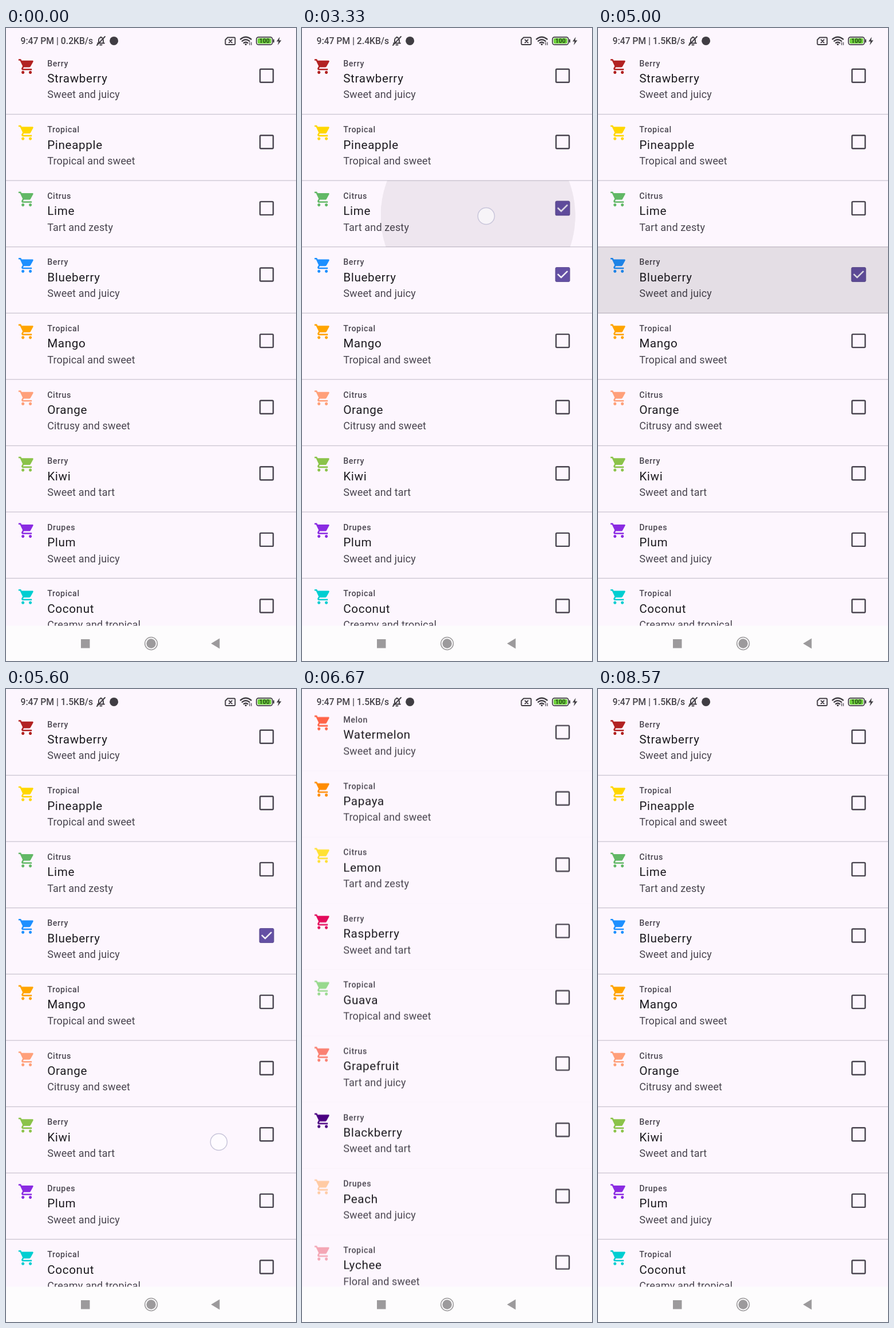
Recreate the animation shown at these times as an HTML page. Size 507x1104 px, loop 8600 ms.

```html
<!DOCTYPE html>
<html lang="en">
<head>
<meta charset="utf-8">
<title>Fruit list</title>
<style>
  html, body { margin: 0; width: 100%; height: 100%; overflow: hidden; background: #fdf6fe; }
  svg { display: block; width: 100%; height: 100%; font-family: Roboto, sans-serif; }
  .label { font-size: 14.2px; font-weight: 500; letter-spacing: .65px; fill: #49454f; }
  .title { font-size: 20.66px; letter-spacing: .65px; fill: #1d1b20; }
  .note { font-size: 18.07px; letter-spacing: .12px; fill: #49454f; }
  .clock { font-size: 15.7px; font-weight: 500; fill: #454248; }
  .box { fill: none; stroke: #49454f; stroke-width: 2.4; }
  .tick { fill: none; stroke: #fff; stroke-width: 2.4; stroke-linecap: square; }
  .ripple { fill: #1d1b20; opacity: 0; }
  .touch { fill: #fff; fill-opacity: .55; stroke: #c8c5da; stroke-width: 1.5; opacity: 0; }
  .line { fill: none; stroke: #403d43; stroke-width: 1.9; stroke-linecap: round; stroke-linejoin: round; }
</style>
</head>
<body>
<svg viewBox="0 0 507 1104" preserveAspectRatio="none">
  <defs>
    <path id="cart" d="M7 18c-1.1 0-2 .9-2 2s.9 2 2 2 2-.9 2-2-.9-2-2-2zM1 2v2h2l3.6 7.6-1.35 2.45c-.16.28-.25.6-.25.95 0 1.1.9 2 2 2h12v-2H7.42c-.14 0-.25-.11-.25-.25l.03-.12.9-1.63h7.45c.75 0 1.41-.41 1.75-1.03l3.58-6.49c.08-.14.12-.31.12-.48 0-.55-.45-1-1-1H5.21l-.94-2H1zm16 16c-1.1 0-2 .9-2 2s.9 2 2 2 2-.9 2-2-.9-2-2-2z"/>
    <clipPath id="row"><rect width="507" height="115.6"/></clipPath>
  </defs>
  <rect width="507" height="1104" fill="#fdf6fe"/>
  <g id="list"><g id="rows"></g><g id="dividers"></g><g id="ripples"></g></g>

  <rect width="507" height="35" fill="#fdf6fe"/>
  <g id="clock"></g>
  <g class="line">
    <path d="M160 26.5h12M162 26v-5a4 4.5 0 0 1 8 0v5M166 15.5v1M164.5 29.5h3M159 30L173 15"/>
    <path d="M387.5 16.5h11.5a1.5 1.5 0 0 1 1.5 1.5v9.5a1.5 1.5 0 0 1-1.5 1.5h-14a1.5 1.5 0 0 1-1.5-1.5v-7zM390 20.5l5 5M395 20.5l-5 5"/>
    <path d="M410 19.5q9-7.5 18.5 0M412.8 22.8q6.2-5 12.8 0M415.8 26q3.3-2.6 6.7 0" stroke-width="2.3"/>
    <path d="M426 25v4.5M429 29.5V25" stroke-width="1.2"/>
    <rect x="437.8" y="15.8" width="28" height="13.4" rx="4" stroke-width="1.7"/>
    <path d="M468 20.5v4" stroke-width="2"/>
  </g>
  <circle cx="188.7" cy="22.4" r="7.5" fill="#403d43"/>
  <circle cx="419.2" cy="28.6" r="1.7" fill="#403d43"/>
  <rect x="439.8" y="17.8" width="24" height="9.4" rx="2.2" fill="#6fd23c"/>
  <text x="451.8" y="26.3" text-anchor="middle" font-size="10.5" font-weight="700" fill="#244a18">100</text>
  <path d="M478.5 15.5l-5.5 8h3.6l-1.6 6.5 6.4-8.6h-3.9z" fill="#403d43"/>

  <rect y="1042.5" width="507" height="62" fill="#fdfcfd"/>
  <g fill="#9c9a9c">
    <rect x="131" y="1066" width="15.5" height="15.5"/>
    <circle cx="253.7" cy="1073.5" r="8.2"/>
    <circle cx="253.7" cy="1073.5" r="10.9" fill="none" stroke="#9c9a9c" stroke-width="1.5"/>
    <path d="M373.5 1064.5v18l-15-9z"/>
  </g>
  <g id="touches"></g>
</svg>
<script>
const LOOP = 8600, TOP = 34.9, PITCH = 115.6, WIDTH = 507, BOX_X = 455.6, BOX_Y = 48.3;
const LIME = 2, BLUEBERRY = 3;
const HOLD = 'steps(1)', EMPHASIS = 'cubic-bezier(.4,0,.2,1)';

const fruits = `Berry|Strawberry|Sweet and juicy|#b22222
Tropical|Pineapple|Tropical and sweet|#ffd700
Citrus|Lime|Tart and zesty|#62b866
Berry|Blueberry|Sweet and juicy|#1e90ff
Tropical|Mango|Tropical and sweet|#ffa500
Citrus|Orange|Citrusy and sweet|#ffa07a
Berry|Kiwi|Sweet and tart|#8bc34a
Drupes|Plum|Sweet and juicy|#8a2be2
Tropical|Coconut|Creamy and tropical|#00ced1
Melon|Watermelon|Sweet and juicy|#ff6347
Tropical|Papaya|Tropical and sweet|#ff8c00
Citrus|Lemon|Tart and zesty|#ffe135
Berry|Raspberry|Sweet and tart|#e30b5c
Tropical|Guava|Tropical and sweet|#98d98e
Citrus|Grapefruit|Tart and juicy|#fa8072
Berry|Blackberry|Sweet and tart|#4b0082
Drupes|Peach|Sweet and juicy|#ffcba4
Tropical|Lychee|Floral and sweet|#f4a6b5
Melon|Cantaloupe|Sweet and mild|#ffb347
Drupes|Apricot|Sweet and tart|#fbaf5d
Berry|Blue Raspberry|Sweet and tangy|#fdf3e8
Citrus|Tangerine|Citrusy and sweet|#fbb917
Drupes|Nectarine|Sweet and juicy|#fdeec4
Melon|Honeydew|Sweet and mild|#f0fff0
Melon|Casaba Melon|Mild and sweet|#fdfbd8
Berry|Cranberry|Tart and refreshing|#dc143c
Tropical|Starfruit|Tart and sweet|#cd5c5c
Tropical|Maracuja|Tropical and tangy|#ffe4a0
Berry|Blackcurrant|Deep and tart|#800010`.split('\n').map(s => s.split('|'));

const $ = id => document.getElementById(id);

function add(parent, tag, attrs = {}, text = '') {
  const el = document.createElementNS('http://www.w3.org/2000/svg', tag);
  for (const k in attrs) el.setAttribute(k, attrs[k]);
  el.textContent = text;
  return parent.appendChild(el);
}

// keys: [ms, value, easing towards the next key]
function play(el, prop, keys) {
  const all = [[0, keys[0][1], HOLD], ...keys, [LOOP, keys[keys.length - 1][1]]];
  el.animate(
    all.map(([ms, v, easing = 'linear']) => ({ offset: ms / LOOP, [prop]: v, easing })),
    { duration: LOOP, iterations: Infinity });
}

const rowY = i => TOP + i * PITCH;
const move = (x, y) => `translate(${x}px, ${y}px)`;

// Rows
const marks = fruits.map(([kind, name, note, color], i) => {
  const row = add($('rows'), 'g', { transform: `translate(0 ${rowY(i)})` });
  add(row, 'use', { href: '#cart', fill: color, transform: 'translate(20.6 16.7) scale(1.291)' });
  add(row, 'text', { class: 'label', x: 72.2, y: 31.8 }, kind);
  add(row, 'text', { class: 'title', x: 72.2, y: 60 }, name);
  add(row, 'text', { class: 'note', x: 72.2, y: 87.6 }, note);
  const box = add(row, 'g', { transform: `translate(${BOX_X} ${BOX_Y})` });
  add(box, 'rect', { class: 'box', x: -11.5, y: -11.5, width: 23, height: 23, rx: 1.5 });
  add($('dividers'), 'rect', { y: rowY(i + 1) - .65, width: WIDTH, height: 1.29, fill: '#cbc5d1' });
  return box;
});

// toggles: times at which the box flips, starting unchecked
function check(i, toggles) {
  const mark = add(marks[i], 'g', { opacity: 0 });
  add(mark, 'rect', { x: -12.7, y: -12.7, width: 25.4, height: 25.4, rx: 2.6, fill: '#6450a4' });
  const tick = add(mark, 'path', {
    class: 'tick', d: 'M-7.74 0L-2.58 5.16L7.74-5.16', pathLength: 1, 'stroke-dasharray': '1 2' });
  play(mark, 'opacity', toggles.flatMap((ms, n) => [[ms, n % 2], [ms + 100, 1 - n % 2]]));
  play(tick, 'strokeDashoffset',
    toggles.flatMap((ms, n) => n % 2 ? [[ms + 100, 0, HOLD], [ms + 101, 1]] : [[ms, 1], [ms + 100, 0]]));
}

// The wave grows for 225 ms while drifting to the centre, then fades for 150 ms.
function ripple(i, ms, x, y, small) {
  const clip = add($('ripples'), 'g', { transform: `translate(0 ${rowY(i)})` });
  if (!small) clip.setAttribute('clip-path', 'url(#row)');
  const [cx, cy, r0, r1] = small ? [BOX_X, BOX_Y, 15.5, 25.8] : [WIDTH / 2, PITCH / 2, 152, 273];
  const drift = add(clip, 'g');
  const wave = add(drift, 'circle', { class: 'ripple', r: 1 });
  play(drift, 'transform', [[ms, move(x, y - rowY(i))], [ms + 225, move(cx, cy)]]);
  play(wave, 'transform', [[ms, `scale(${r0})`, EMPHASIS], [ms + 225, `scale(${r1})`]]);
  play(wave, 'opacity', [[ms, 0], [ms + 75, .11], [ms + 225, .11], [ms + 375, 0]]);
}

function touch(down, up, x, y, endY = y, easing = 'linear') {
  const dot = add($('touches'), 'circle', { class: 'touch', r: 14.6 });
  play(dot, 'opacity', [[down - 1, 0, HOLD], [down, 1, HOLD], [up, 0]]);
  play(dot, 'transform', [[down, move(x, y), HOLD], [down + 15, move(x, y), easing], [up, move(x, endY)]]);
}

function tap(i, down, up, wave, x, y, small) {
  touch(down, up, x, y);
  ripple(i, wave, x, y, small);
}

tap(LIME, 770, 860, 860, 345, 322);
tap(BLUEBERRY, 1870, 1960, 1960, 369.5, 437.5);
tap(LIME, 3184, 3360, 3284, 322, 328);
tap(BLUEBERRY, 3990, 4080, 4080, 455, 431, true);
tap(BLUEBERRY, 4730, 4800, 4800, 340, 440);
tap(BLUEBERRY, 7418, 7560, 7518, 321, 470.5);
check(LIME, [860, 3360]);
check(BLUEBERRY, [1960, 4080, 4800, 7560]);

// Fling down the list and back
const PULL = 'cubic-bezier(.5,.1,.8,.7)';
touch(5600, 5740, 372, 790, 410, PULL);
touch(6215, 6390, 370, 615.5, 915.5, PULL);
play($('list'), 'transform', [
  [5615, move(0, 0), PULL],
  [5740, move(0, -380), 'cubic-bezier(.3,.4,.6,.95)'],
  [6225, move(0, -2359.5), HOLD],
  [6230, move(0, -2359.5), PULL],
  [6390, move(0, -2059.5), 'cubic-bezier(.28,.42,.6,1)'],
  [7250, move(0, 0)]]);
play($('dividers'), 'opacity', [[5640, 1], [5720, .05], [7150, .05], [7290, 1]]);

// Network speed in the status bar
[['0.2', 0, 900], ['2.4', 900, 3900], ['1.5', 3900, LOOP]].forEach(([rate, from, to]) => {
  const el = add($('clock'), 'text', { class: 'clock', x: 25.5, y: 28.2 }, `9:47 PM | ${rate}KB/s`);
  const keys = [[from, 1, HOLD]];
  if (from) keys.unshift([from - 1, 0, HOLD]);
  if (to < LOOP) keys.push([to, 0]);
  play(el, 'opacity', keys);
});
</script>
</body>
</html>
```
